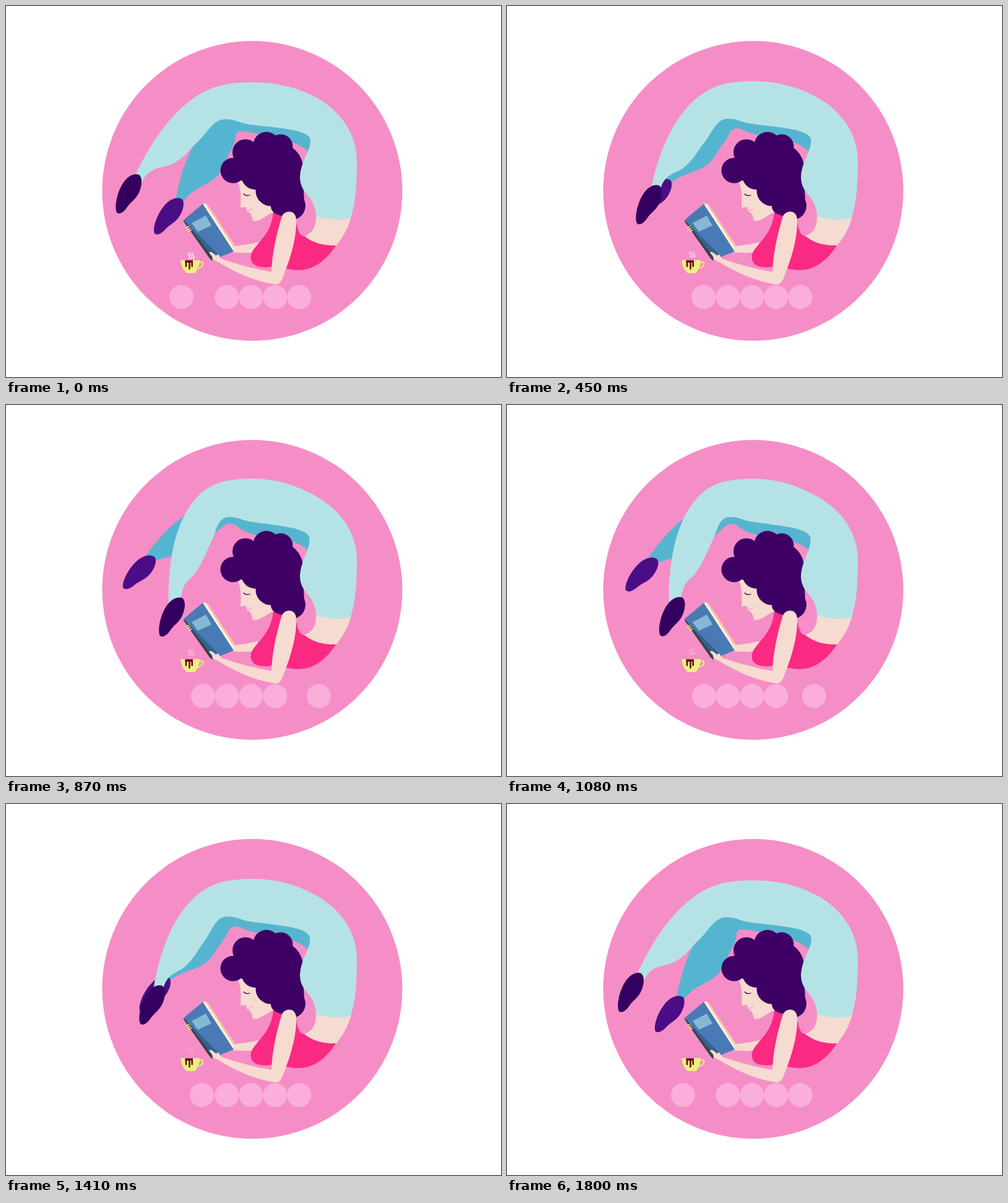
An HTML page that plays this animation: 800 px wide and 600 px high, repeating every 1.83 s.

```html
<!DOCTYPE html>
<html lang="en">
<head>
<meta charset="utf-8">
<title>Reading stretch</title>
<style>
html, body { margin: 0; width: 100%; height: 100%; overflow: hidden; background: #fff; }
svg { display: block; width: 100vw; height: 100vh; }
</style>
</head>
<body>
<svg viewBox="0 0 800 600">
  <defs>
    <path id="shoe" d="M-19 30C-23 23-20-1-8-19C0-30 10-34 17-31C22-27 22-17 19-8C14 8 5 11-2 21C-8 30-15 34-19 30Z"/>
  </defs>
  <circle cx="398" cy="299" r="242.5" fill="#f58ec6"/>

  <g fill="#fbaed9">
    <circle id="left" cx="318.3" cy="470.7" r="19.5"/>
    <circle cx="357" cy="470.7" r="19.5"/>
    <circle cx="396" cy="470.7" r="19.5"/>
    <circle cx="435" cy="470.7" r="19.5"/>
    <circle id="right" cx="474" cy="470.7" r="19.5"/>
  </g>

  <path id="farLeg" fill="#55b5d0"/>
  <use id="farShoe" href="#shoe" fill="#4b0d85"/>

  <!-- torso and face -->
  <g fill="#f6dbd0">
    <path d="M501 335C502 352 498 368 481 372L500 392L533 388C543 376 552 362 558 341Z"/>
    <path d="M364 389C378 387 392 386 408 382L402 398C390 400 376 399 365 398Z"/>
    <path d="M374 282C380 296 380 308 379 326L388 325L389 332C395 333 397 338 399 347C408 351 420 338 432 334L445 300L400 270Z"/>
  </g>
  <path fill="#fa2a82" d="M432 334C429 365 411 379 400 394C390 408 398 421 412 422C425 424 433 421 440 417L454 425C464 427 474 428 484 426C505 422 523 404 533 387C514 388 498 384 482 372C474 372 471 360 468 345L448 332Z"/>
  <g fill="none" stroke-linecap="round">
    <path d="M384 304Q388 308 394 306" stroke="#34005f" stroke-width="1.3"/>
    <path d="M389 330Q395 332 398 327" stroke="#ef7c91" stroke-width=".8"/>
  </g>

  <g fill="#3f0066">
    <circle cx="367" cy="266" r="20.5"/>
    <circle cx="387" cy="236.5" r="21"/>
    <circle cx="421" cy="225" r="21.5"/>
    <circle cx="444" cy="227" r="19.5"/>
    <circle cx="440" cy="262" r="40"/>
    <circle cx="428" cy="299" r="24.5"/>
    <circle cx="461" cy="323" r="23"/>
    <path d="M369 275L382 283C386 292 394 297 404 297L428 322C427 332 436 339 450 339L482 315L479 260L440 220L385 230Z"/>
  </g>

  <path id="nearLeg" fill="#b5e3e5"/>
  <use id="nearShoe" href="#shoe" fill="#34005f"/>

  <!-- book -->
  <path fill="#fff5df" d="M317 321L322 319L369 386L367 397Z"/>
  <path fill="#f7c9a8" d="M322 320L326 321L369 386L368 391Z"/>
  <path fill="#4a7ab5" d="M287 346L318 320L368 397L333 411Z"/>
  <path fill="#35618f" d="M287 346L347 406L333 411Z"/>
  <path fill="#3a4048" d="M286 347L290 349L334 407L333 412L329 408Z"/>
  <path fill="#85b9d3" d="M300 351L323 339L332 355L310 365Z"/>
  <path fill="none" stroke="#eef06a" stroke-width="1.7" d="M291 359L296 356M293 362L298 359M295 365L300 362"/>

  <!-- front arm -->
  <path fill="#f6dbd0" d="M445 343C448 329 469 328 469 346C470 379 457 415 447 440C444 448 440 451 434 450C402 445 370 431 343 414L334 410L333 405L328 399Q330 396 335 400L340 404Q341 400 344 403L348 409C375 418 400 425 429 430C430 400 437 370 445 343Z"/>

  <!-- cup -->
  <path fill="#ecf07e" d="M282 411H313C313 420 309 428 305 432H292C286 427 283 419 282 411Z"/>
  <path fill="none" stroke="#ecf07e" stroke-width="2" d="M312 415C316 413 319 414 318 418C317 422 313 424 308 424"/>
  <path fill="none" stroke="#650c1d" stroke-width="2.6" stroke-linecap="round" stroke-linejoin="round" d="M291 421V413H300.7V421M296.500 413V425"/>
  <path fill="#650c1d" d="M289.500 411.300H302V415H289.500Z"/>
  <g id="steam" fill="none" stroke="#fff" stroke-width="1.2" stroke-linecap="round">
    <path d="M296 399.5q-3 2 0 5t-1 4M299.500 399.5q-3 2 0 5t-1 4M303 399.5q-3 2 0 5t-1 4"/>
  </g>
</svg>
<script>
const LOOP = 1830;
const el = id => document.getElementById(id);
const clamp = x => Math.min(1, Math.max(0, x));
const ease = x => (1 - Math.cos(Math.PI * clamp(x))) / 2;
const ramp = (t, from, to) => ease((t - from) / (to - from));
const swing = (t, period) => (1 - Math.cos(2 * Math.PI * (t - 20) / period)) / 2;
const mix = (a, b, p) => a + (b - a) * p;

// Blends two paths that share the same commands.
function blend([from, to], p) {
  const ends = to.match(/[\d.]+/g);
  let i = 0;
  return from.replace(/[\d.]+/g, n => mix(+n, +ends[i++], p).toFixed(2));
}

// The hip and the back of the thigh stay still.
const hip = "C494 232 476 250 475 277C476 298 487 303 494 315C499 324 501 332 501 340C520 346 540 347 557 343Z";
const back = "M557 343C563 322 567 305 567 250C567 211 545 173 504 149.5";
const near = [
  back + "C476 133.5 441 123.5 398 123.5C388 123.5 370 124 360 126C300 134 249 190 209 273L205 288L219 287C227 264 246 262 262 258C281 252 293 237 303 226C325 208 333 183 355 183C370 183 374 188 390 191C430 197 488 198 492 216" + hip,
  back + "C476 133 441 119 398 119C385 119 362 121 350 124C300 136 260 202 264 322L272 330L284 314C287 286 297 285 306 273C318 256 324 240 330 226C342 204 340 181 362 181C374 181 378 185 392 188C432 195 486 197 490 214" + hip
];
const far = [
  "M274 313C281 280 289 250 303 226C320 205 330 186 345 183L400 185L470 190L494 205L489 236C478 225 458 217 430 210C410 208 395 204 383 202.5C374 202 371 206 371 212C369 230 358 240 352 258C338 293 305 288 287 316L272 328Z",
  "M222 248C243 218 262 196 289 178C310 168 325 180 345 176L400 180L470 190L494 205L489 236C478 225 458 217 430 211C405 215 385 205 373 196C362 187 352 193 345 201C330 212 326 218 316 226C295 244 262 243 240 251L225 260Z"
];

function place(id, x, y, turn) {
  el(id).setAttribute("transform", `translate(${x} ${y}) rotate(${turn})`);
}

function draw(now) {
  const t = now % LOOP;
  const n = swing(t, 1880), f = swing(t, 1825);

  el("nearLeg").setAttribute("d", blend(near, n));
  el("farLeg").setAttribute("d", blend(far, f));
  place("nearShoe", mix(198, 269.5, n), mix(304, 344, n), 0);
  place("farShoe", mix(263, 215, f), mix(340.5, 270.5, f), mix(8.5, 16, f));

  const out = 1 - ramp(t, 15, 490) + ramp(t, 1336, 1850);
  el("left").setAttribute("cx", 318.3 - 34.6 * out);
  el("right").setAttribute("cx", 474 + 32 * (ramp(t, 460, 905) - ramp(t, 905, 1380)));

  el("steam").setAttribute("transform", `translate(0 ${-8 * t / LOOP})`);
  el("steam").setAttribute("opacity", 1 - t / LOOP);
}

const start = performance.now();
function tick() {
  draw(performance.now() - start);
  requestAnimationFrame(tick);
}
tick();
</script>
</body>
</html>
```
